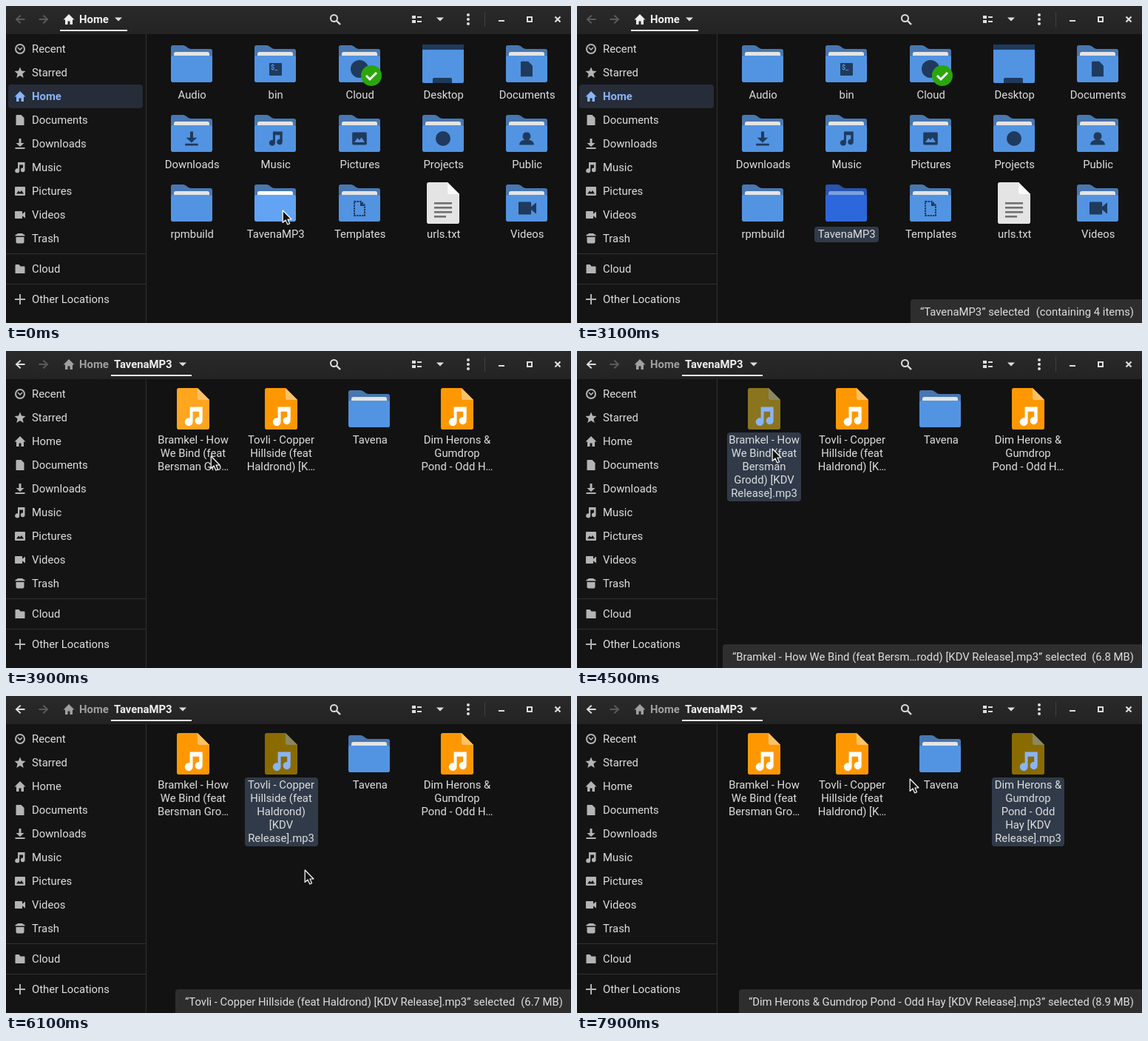
Animation of 764 by 428 pixels, one loop 8000 ms. Source, as an HTML page:

```html
<!DOCTYPE html>
<html lang="en">
<head>
<meta charset="utf-8">
<title>File manager</title>
<style>
html, body { margin: 0; width: 100%; height: 100%; overflow: hidden; background: #121212; }
svg { display: block; width: 100%; height: 100%; }
text { font: 14.85px Roboto, sans-serif; fill: #dedede; white-space: pre; }
.b { font-weight: 700; }
.m { text-anchor: middle; }
.e { text-anchor: end; }
</style>
</head>
<body>
<svg id="stage" viewBox="0 0 764 428"></svg>
<script>
const LOOP = 8000, STEP = 100;
const stage = document.getElementById('stage');
const BLUE = '#8ab4f8', INK = '#1f3a5c', GREY = '#b4b4b4', DIM = '#5a5a5a', LIGHT = '#dedede';

// Glyphs centred on 0,0, about 14 px wide
const glyphs = {
  star: 'M0-7.5L2.1-2.4L7.5-2L3.4 1.6L4.7 7L0 4.1L-4.7 7L-3.4 1.6L-7.5-2L-2.1-2.4Z',
  home: 'M0-7L7.5 .5H5V7H1.5V2.5H-1.5V7H-5V.5H-7.5Z',
  doc: 'M-4.5-7H1.5L5.5-3V7H-5.5V-6Q-5.5-7-4.5-7Z',
  down: 'M-1.5-7H1.5V-1H5.5L0 4L-5.5-1H-1.5ZM-6.5 5H6.5V7H-6.5Z',
  music: 'M-3-7H6.5V3.2A2.8 2.8 0 1 1 4 .6V-3.5H-.8V4.2A3 3 0 1 1-3 1.4Z',
  picture: 'M-6-6H6Q7-6 7-5V5Q7 6 6 6H-6Q-7 6-7 5V-5Q-7-6-6-6ZM-5 3.5H5L2-1L0 1.5L-2-.5Z',
  video: 'M-6.5-5H2.5Q3-5 3-4V-1.2L7-4.5V4.5L3 1.2V4Q3 5 2.5 5H-6.5Q-7 5-7 4V-4Q-7-5-6.5-5Z',
  trash: 'M-6.5-4.5Q-6.5-5.5-5-5.5L-3-7H3L5-5.5Q6.5-5.5 6.5-4.5V-3.5H-6.5ZM-5.5-2H5.5V4.5Q5.5 6.5 3.5 6.5H-3.5Q-5.5 6.5-5.5 4.5Z',
  folder: 'M-5.5-6H-1.5L.5-3.5H5.5Q6.5-3.5 6.5-2.5V6H-6.5V-5Q-6.5-6-5.5-6Z',
  plus: 'M-1-7H1V-1H7V1H1V7H-1V1H-7V-1H-1Z',
  back: 'M-6.5 0L0-6L1.4-4.6L-2.6-1H6.5V1H-2.6L1.4 4.6L0 6Z',
  person: 'M0-8A4.5 5 0 0 1 2.5 1.5Q9.5 3 9.5 8H-9.5Q-9.5 3-2.5 1.5A4.5 5 0 0 1 0-8Z'
};

const rect = (x, y, w, h, fill, r = 0, more = '') =>
  `<rect x="${x}" y="${y}" width="${w}" height="${h}" rx="${r}" fill="${fill}" ${more}/>`;
const path = (d, fill, more = '') => `<path d="${d}" fill="${fill}" ${more}/>`;
const line = (d, stroke, w = 2, more = '') => path(d, 'none', `stroke="${stroke}" stroke-width="${w}" ${more}`);
const disc = (x, y, r, fill) => `<circle cx="${x}" cy="${y}" r="${r}" fill="${fill}"/>`;
const at = (x, y, body, k = 1) => `<g transform="translate(${x} ${y}) scale(${k})">${body}</g>`;
const glyph = (name, x, y, fill, k = 1) => at(x, y, path(glyphs[name], fill, 'fill-rule="evenodd"'), k);
const text = (s, x, y, cls = '', fill = LIGHT) =>
  `<text x="${x}" y="${y}" class="${cls}" style="fill:${fill}">${s.replace(/&/g, '&amp;')}</text>`;
const caret = x => path(`M${x - 5} 15.5h10l-5 5z`, LIGHT);

function header(inside) {
  let s = '<linearGradient id="bar" x2="0" y2="1"><stop stop-color="#2a2a2a"/><stop offset="1" stop-color="#232323"/></linearGradient>' +
    rect(0, 0, 764, 38, 'url(#bar)') +
    glyph('back', 19, 18, inside ? LIGHT : DIM) +
    `<g transform="translate(51 18) scale(-1 1)">${path(glyphs.back, DIM)}</g>`;
  const tone = inside ? '#a0a0a0' : '#f0f0f0';
  s += glyph('home', 85, 18, tone) + text('Home', 99, 23, 'b', tone);
  s += inside
    ? text('TavenaMP3', 146, 23, 'b', '#f0f0f0') + caret(239) + rect(142, 32, 109, 2, '#f0f0f0')
    : caret(152) + rect(73, 32, 91, 2, '#f0f0f0');
  s += `<circle cx="443.5" cy="16.5" r="4.5" fill="none" stroke="${LIGHT}" stroke-width="2"/>` +
    line('M447 20L452 25', LIGHT, 2.4);
  for (const y of [13, 19]) s += rect(549, y, 5, 4, LIGHT) + rect(556, y + 1, 6, 2, LIGHT);
  s += caret(587);
  for (const y of [12, 18, 24]) s += disc(625, y, 2, LIGHT);
  return s + rect(647, 8, 1, 20, '#404040') + rect(666, 19, 8, 2, LIGHT) +
    rect(705, 15, 6, 6, 'none', 0, `stroke="${LIGHT}" stroke-width="2"`) +
    line('M742.5 14.5L749.5 21.5M749.5 14.5L742.5 21.5', LIGHT, 2.2);
}

const places = [['Recent', 'clock'], ['Starred', 'star'], ['Home', 'home'], ['Documents', 'doc'],
  ['Downloads', 'down'], ['Music', 'music'], ['Pictures', 'picture'], ['Videos', 'video'], ['Trash', 'trash']];

function sidebar(glow) {
  let s = rect(0, 38, 189, 390, '#141414') + rect(189, 38, 1, 390, '#303030') +
    rect(3, 106, 182, 32, '#262c38', 4, `opacity="${glow}"`);
  places.forEach(([name, icon], i) => {
    const y = 58 + 32 * i, on = name === 'Home' && glow > .5;
    s += icon === 'clock'
      ? `<circle cx="19" cy="${y}" r="6" fill="none" stroke="${GREY}" stroke-width="2"/>` + line(`M16 ${y - 2}l3 3l3-3`, GREY, 1.6)
      : glyph(icon, 19, y, on ? BLUE : GREY);
    s += text(name, 35, y + 5, on ? 'b' : '', on ? BLUE : LIGHT);
  });
  return s + rect(0, 334, 189, 1, '#303030') + glyph('folder', 19, 355, GREY) + text('Cloud', 35, 360) +
    rect(0, 375, 189, 1, '#303030') + glyph('plus', 19, 396, GREY) + text('Other Locations', 35, 401);
}

// Folder whose top left corner is x, y
function folder(x, y, sel, hover) {
  const back = sel ? '#2754ac' : '#4877b1';
  const paper = sel ? '#7ba1de' : hover ? '#fafafa' : '#e4e4e4';
  const front = sel ? (hover ? '#3573ed' : '#2c68dc') : hover ? '#62a3f4' : '#5294e2';
  return at(x, y, path('M2.8 0H16.1C20.3 0 23.1 5 27.3 5H53.2Q56 5 56 7.8V40H0V2.8Q0 0 2.8 0Z', back) +
    rect(4, 9, 48, 20, paper, 2.8) + rect(0, 14, 56, 36, front, 2.8));
}

function sheet(x, y, body, fold) {
  return at(x, y, path('M2.8 0H28L44 16V53.2Q44 56 41.2 56H2.8Q0 56 0 53.2V2.8Q0 0 2.8 0Z', body) +
    path('M28 0L44 16H30.8Q28 16 28 13.2Z', fold));
}

const names = ['Audio', 'bin', 'Cloud', 'Desktop', 'Documents', 'Downloads', 'Music', 'Pictures',
  'Projects', 'Public', 'rpmbuild', 'TavenaMP3', 'Templates', 'urls.txt', 'Videos'];

const emblems = {
  bin: (x, y) => rect(x - 8, y - 8, 17, 17, INK, 1) +
    `<text x="${x - 6}" y="${y + 1}" style="font:700 9px 'Roboto',sans-serif;fill:#5294e2">$_</text>`,
  Cloud: (x, y) => disc(x, y, 12, INK) + disc(x + 16, y + 9, 14, '#2aa60c') +
    line(`M${x + 9} ${y + 9}l5 5l9-9`, '#fff', 3),
  Documents: (x, y) => glyph('doc', x, y, INK, 1.45),
  Downloads: (x, y) => glyph('down', x, y, INK, 1.35),
  Music: (x, y) => glyph('music', x + 1, y, INK, 1.35),
  Pictures: (x, y) => glyph('picture', x, y, INK, 1.4),
  Projects: (x, y) => disc(x, y, 10, INK),
  Public: (x, y) => glyph('person', x, y, INK, 1.05),
  Templates: (x, y) => line(`M${x - 7} ${y - 9}h9l5 5v14h-14z`, INK, 2, 'stroke-dasharray="2.5 1"') +
    path(`M${x + 1} ${y - 9}l6 6h-6z`, INK),
  Videos: (x, y) => glyph('video', x + 1, y, INK, 1.72)
};

function homeView(sel, hover) {
  return names.map((name, i) => {
    const col = i % 5, row = Math.floor(i / 5);
    const x = Math.round(223 + 113.3 * col), y = 53 + 94 * row, cx = x + 28;
    const mine = name === 'TavenaMP3';
    let s = '';
    if (name === 'Desktop') {
      s = rect(x, y - 1, 56, 52, '#5294e2', 2) + path(`M${x} ${y + 6}v-5q0-2 2-2h52q2 0 2 2v5z`, INK) +
        path(`M${x + 14} ${y + 51}v-5q0-2 2-2h22q2 0 2 2v5z`, INK);
    } else if (name === 'urls.txt') {
      s = sheet(569, 238, '#e4e4e4', '#fafafa');
      for (let k = 0; k < 4; k++) s += rect(579, 265 + 6 * k, k < 3 ? 24 : 16, 2.6, '#707070');
    } else {
      s = folder(mine ? 336 : x, y, mine && sel, mine && hover);
      if (emblems[name]) s += emblems[name](cx, y + 32);
    }
    if (mine && sel) s += rect(321, 298, 87, 21, '#303a49', 4);
    return s + text(name, cx + .7, y + 72, 'm');
  }).join('');
}

// x: icon, cx: label centre, l/w: selected label box
const songs = [
  { x: 231, cx: 253, l: 203, w: 100,
    short: ['Bramkel - How', 'We Bind (feat', 'Bersman Gro…'],
    full: ['Bramkel - How', 'We Bind (feat', 'Bersman', 'Grodd) [KDV', 'Release].mp3'],
    bar: 197, note: '“Bramkel - How We Bind (feat Bersm…rodd) [KDV Release].mp3” selected', size: '(6.8 MB)' },
  { x: 350, cx: 372, l: 323, w: 99,
    short: ['Tovli - Copper', 'Hillside (feat', 'Haldrond) [K…'],
    full: ['Tovli - Copper', 'Hillside (feat', 'Haldrond)', '[KDV', 'Release].mp3'],
    bar: 229, note: '“Tovli - Copper Hillside (feat Haldrond) [KDV Release].mp3” selected', size: '(6.7 MB)' },
  { x: 588, cx: 610, l: 561, w: 98,
    short: ['Dim Herons &', 'Gumdrop', 'Pond - Odd H…'],
    full: ['Dim Herons &', 'Gumdrop', 'Pond - Odd', 'Hay [KDV', 'Release].mp3'],
    bar: 219, note: '“Dim Herons & Gumdrop Pond - Odd Hay [KDV Release].mp3” selected', size: '(8.9 MB)' }
];

const within = (p, x, y, w, h) => p && p[0] >= x && p[0] <= x + w && p[1] >= y && p[1] <= y + h;

function songView(chosen, p) {
  let s = folder(463, 53, false, within(p, 463, 50, 56, 78)) + text('Tavena', 492.3, 125, 'm');
  songs.forEach((f, i) => {
    const sel = i === chosen, hover = within(p, f.l, 50, f.w, sel ? 153 : 116);
    const body = sel ? (hover ? '#8a741d' : '#8a6b00') : hover ? '#ffa51e' : '#ff9800';
    s += sheet(f.x, 50, body, sel ? '#8a8863' : '#ffc166') +
      glyph('music', f.x + 23, 88, sel ? BLUE : '#fff', 1.8);
    if (sel) s += rect(f.l, 110, f.w, 93, '#303a49', 4);
    (sel ? f.full : f.short).forEach((row, k) => s += text(row, f.cx, 125 + 18 * k, 'm'));
  });
  return s;
}

const status = (x, left, right) => path(`M${x} 428V400Q${x} 396 ${x + 4} 396H764V428Z`, '#2e2e2e') +
  text(left, x + 13, 418) + text(right, 753, 418, 'e');

// Pointer moves: start, end, ease-out power, cubic curve
const moves = [
  [3500, 4100, 2, [375, 276], [341, 208], [304, 160], [265, 132]],
  [4600, 5500, 1.5, [265, 132], [288, 268], [331, 271], [392, 140]],
  [5900, 6800, 1.42, [392, 140], [370, 270], [477, 340], [636, 132]],
  [7200, 7900, 1.5, [636, 132], [570, 110], [500, 100], [451, 112]]
];

function pointer(t) {
  if (t >= 3100 && t < 3400) return null;
  const [a, b, power, p0, p1, p2, p3] = moves.filter(m => t >= m[0]).pop() || moves[0];
  const k = Math.min(1, Math.max(0, (t - a) / (b - a)));
  const s = 1 - (1 - k) ** power, r = 1 - s;
  return p0.map((v, i) => Math.round(r * r * r * v + 3 * r * r * s * p1[i] + 3 * r * s * s * p2[i] + s * s * s * p3[i]));
}

const arrow = ([x, y]) => at(x - .8, y, path('M0 0V16.5L3.8 13L6.6 19L9.4 17.8L6.8 12H11.8Z', '#111',
  'stroke="#fff" stroke-width="1.2" stroke-linejoin="round"'));

// Index of the latest song whose time has come
const latest = (t, times) => times.filter(v => t >= v).length - 1;

function draw(t) {
  const inside = t >= 3200, p = pointer(t);
  const glow = t < 3200 ? 1 : t < 3300 ? .5 : t < 3400 ? .2 : 0;
  let s = rect(0, 0, 764, 428, '#121212') + header(inside) + sidebar(glow);
  if (inside) {
    s += songView(latest(t, [4200, 5600, 6900]), p);
    const f = songs[latest(t, [4500, 5700, 7300])];
    if (f) s += status(f.bar, f.note, f.size);
  } else {
    s += homeView(t >= 1300, p);
    if (t >= 1500) s += status(451, '“TavenaMP3” selected', '(containing 4 items)');
  }
  stage.innerHTML = s + (p ? arrow(p) : '');
}

const start = performance.now();
let shown = -1;
function tick() {
  const t = Math.floor((performance.now() - start) % LOOP / STEP) * STEP;
  if (t !== shown) draw(shown = t);
  requestAnimationFrame(tick);
}
tick();
</script>
</body>
</html>
```
